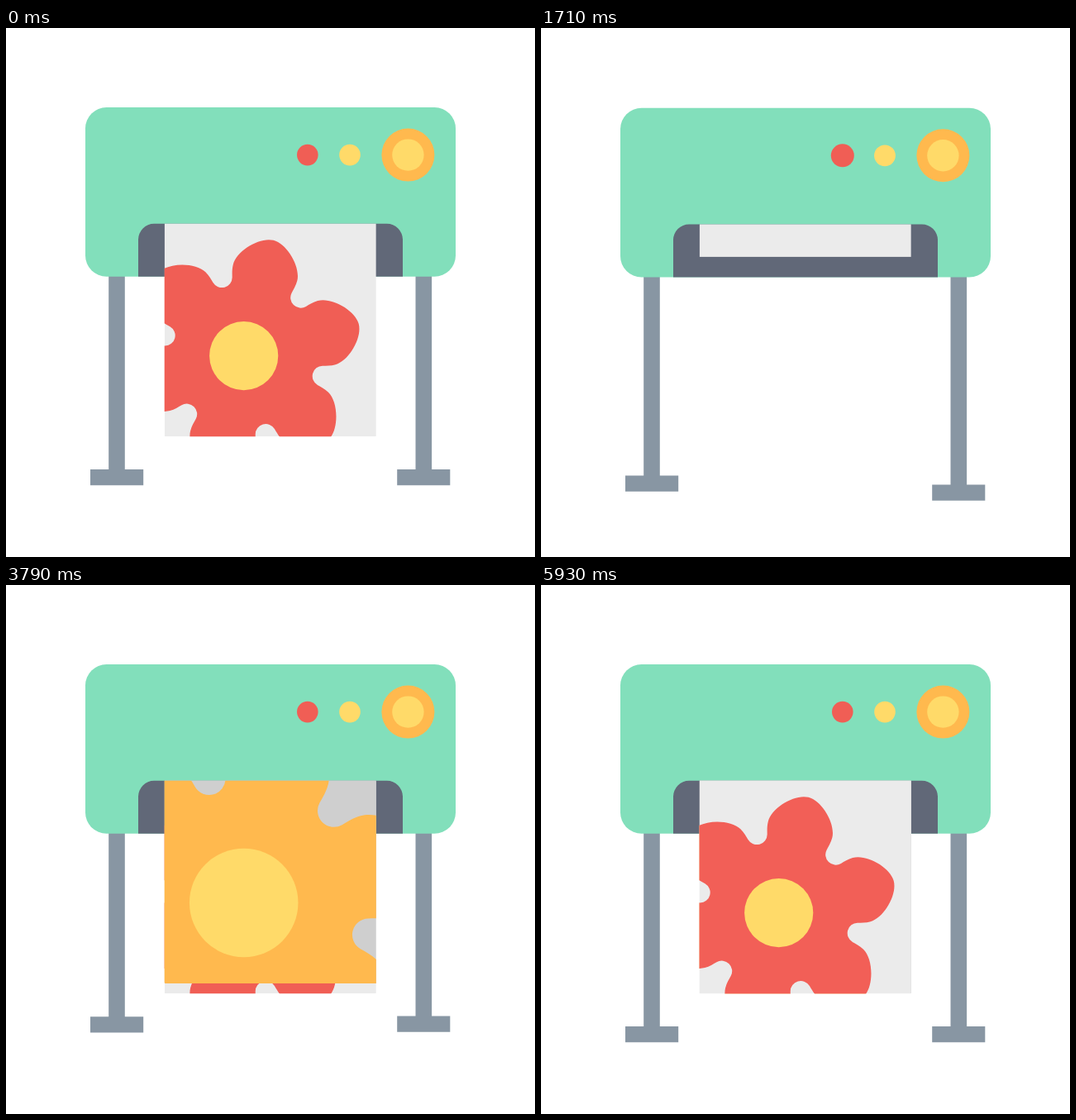
An HTML page that plays this animation: 640 px wide and 640 px high, repeating every 6000 ms.

```html
<!DOCTYPE html>
<html lang="en">
<head>
<meta charset="utf-8">
<title>Plotter</title>
<style>
  html, body { margin: 0; width: 100%; height: 100%; overflow: hidden; background: #fff; }
  svg { display: block; width: 100%; height: 100%; }

  .body, .foot, .button, .sheet, .bloom, .spin {
    animation: 6s cubic-bezier(.37, 0, .63, 1) infinite;
  }
  .body { animation-name: hop; }
  .foot { animation-name: stretch; fill: #8896a3; }
  .foot.right { animation-delay: 82ms; }
  .button { animation-name: press; }
  .button.second { animation-delay: 83ms; }
  .button.third { animation-delay: 167ms; }
  .spin { animation-name: sway; }

  .one { --paper: #ebebeb; color: #f05e55; }
  .two { --paper: #cfcfcf; color: #ffb94e; }
  .three { --paper: #ebebeb; color: #f25f57; }
  .paper { fill: var(--paper); }
  .one .sheet { animation-name: feed-one; }
  .two .sheet { animation-name: feed-two; }
  .three .sheet { animation-name: feed-three; }
  .one .bloom { animation-name: bloom-one; }
  .two .bloom { animation-name: bloom-two; }
  .three .bloom { animation-name: bloom-three; }

  @keyframes hop {
    0%, 29.33%, 100% { translate: 0 0; }
    9.78% { translate: 0 -39px; }
    19.55% { translate: 0 41.7px; }
  }
  @keyframes stretch {
    0%, 1.42%, 30.75%, 41.67%, 71.67%, 100% { translate: 0 0; }
    11.2% { translate: 0 -39px; }
    20.98% { translate: 0 62.5px; }
    51.67% { translate: 0 25.8px; }
    61.67% { translate: 0 -12.4px; }
  }
  @keyframes press {
    0%, 26.55%, 43.8%, 66.83%, 84.08%, 100% { scale: 1; }
    32.63%, 72.92% { scale: 1.4; }
    39.8%, 80.08% { scale: .7; }
  }
  @keyframes sway {
    0%, 29.33%, 100% { rotate: 0deg; }
    9.78% { rotate: -10deg; }
    19.55% { rotate: 11deg; }
  }

  @keyframes feed-one {
    0%, 9.78%, 46.25%, 100% { translate: 0 0; }
    21.62% { translate: 0 16px; }
    30.83% { translate: 0 -258px; }
  }
  @keyframes feed-two {
    0%, 49.93% { translate: 0 -258px; }
    65.35%, 100% { translate: 0 0; }
  }
  @keyframes feed-three {
    0%, 69.55% { translate: 0 -258px; }
    84.97%, 100% { translate: 0 0; }
  }

  @keyframes bloom-one {
    0%, 20.83%, 59.48%, 100% { scale: 1; }
    28.33%, 37.48% { scale: 0; }
    44.82% { scale: 1.62; }
    52.15% { scale: .8; }
  }
  @keyframes bloom-two {
    0%, 56.58% { scale: 0; }
    63.92% { scale: 1.62; }
    71.25% { scale: .8; }
    78.58%, 100% { scale: 1; }
  }
  @keyframes bloom-three {
    0%, 76.2% { scale: 0; }
    83.53% { scale: 1.62; }
    90.87% { scale: .8; }
    98.2%, 100% { scale: 1; }
  }
</style>
</head>
<body>
<svg viewBox="0 0 640 640">
  <defs>
    <clipPath id="mouth"><rect x="160" y="236.8" width="320" height="420"/></clipPath>
    <clipPath id="trim"><rect x="191.7" y="100" width="256.1" height="394.2"/></clipPath>
    <g id="flower">
      <path id="petals" fill="currentColor"/>
      <circle r="41.6" fill="#ffda69"/>
    </g>
  </defs>

  <g class="foot">
    <path d="M124.2 150h19.6v384h22.4v19.2H102V534h22.2z"/>
  </g>
  <g class="foot right">
    <path d="M495.5 150h19.6v384h22.2v19.2H473.2V534h22.3z"/>
  </g>

  <g class="body">
    <rect x="96" y="96" width="448" height="204.8" rx="25.6" fill="#82dfbb"/>
    <path fill="#616878" d="M160 300.8V256a19.2 19.2 0 0 1 19.2-19.2h281.6A19.2 19.2 0 0 1 480 256v44.8z"/>

    <g transform="translate(364.8 153.6)"><circle class="button" r="12.8" fill="#f05e55"/></g>
    <g transform="translate(416 153.6)"><circle class="button second" r="12.8" fill="#ffda69"/></g>
    <g transform="translate(486.4 153.6)">
      <g class="button third">
        <circle r="32" fill="#ffb94e"/>
        <circle r="19.2" fill="#ffda69"/>
      </g>
    </g>

    <g clip-path="url(#mouth)">
      <g class="one">
        <g class="sheet" clip-path="url(#trim)">
          <rect class="paper" x="191.7" y="100" width="256.1" height="394.2"/>
          <g transform="translate(287.7 396.6)">
            <g class="spin"><g class="bloom"><use href="#flower"/></g></g>
          </g>
        </g>
      </g>
      <g class="two">
        <g class="sheet" clip-path="url(#trim)">
          <rect class="paper" x="191.7" y="100" width="256.1" height="394.2"/>
          <g transform="translate(287.7 396.6)"><g class="bloom"><use href="#flower"/></g></g>
        </g>
      </g>
      <g class="three">
        <g class="sheet" clip-path="url(#trim)">
          <rect class="paper" x="191.7" y="100" width="256.1" height="394.2"/>
          <g transform="translate(287.7 396.6)"><g class="bloom"><use href="#flower"/></g></g>
        </g>
      </g>
    </g>
  </g>
</svg>
<script>
  // Half a petal along the x axis, from the notch to the tip; the other half mirrors it.
  const half = [[88.5, -37.2], [93, -38.4], [98, -40], [104, -40], [121.2, -40], [144.3, -17], [144.3, 0]];
  const petal = [...half, ...half.slice(0, -1).reverse().map(([x, y]) => [x, -y])];

  const turn = ([x, y], a) => {
    const c = Math.cos(a), s = Math.sin(a);
    return `${(x * c - y * s).toFixed(2)} ${(x * s + y * c).toFixed(2)}`;
  };

  const notch = 'A12.5 12.5 0 0 0 ';
  let d = '';
  for (let i = 0; i < 6; i++) {
    const [start, ...curve] = petal.map(p => turn(p, (i * 60 - 15.6) * Math.PI / 180));
    d += (i ? notch : 'M') + start + 'C' + curve.join(' ');
  }
  d += notch + turn(petal[0], -15.6 * Math.PI / 180) + 'Z';
  document.getElementById('petals').setAttribute('d', d);
</script>
</body>
</html>
```
